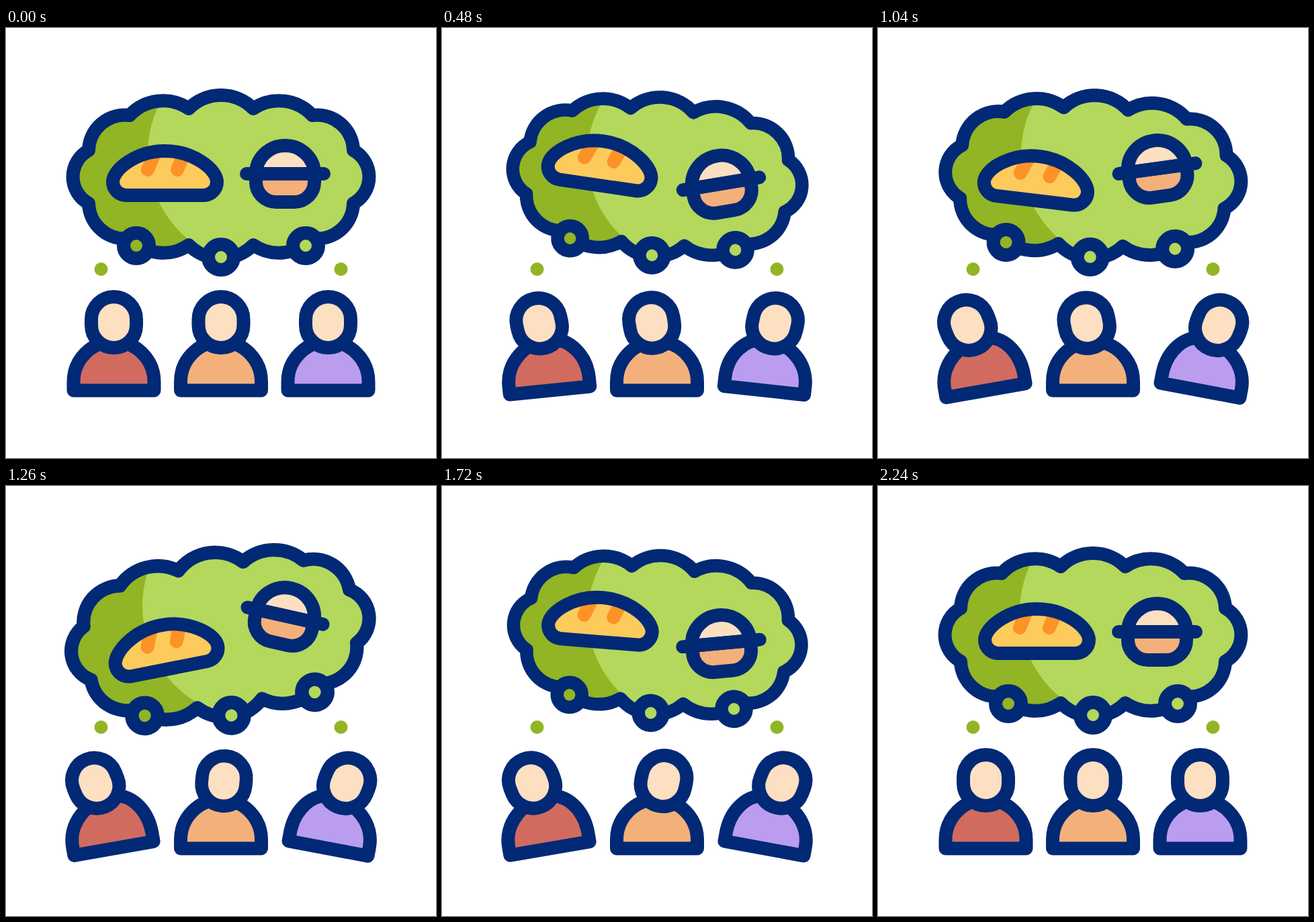
Animation, 640 px wide and 640 px high, one loop 2400 ms. Source, as an HTML page:

```html
<!DOCTYPE html>
<html lang="en">
<head>
<meta charset="utf-8">
<title>Shared thought</title>
<style>
  html, body { margin: 0; height: 100%; overflow: hidden; background: #fff; }
  svg { display: block; width: 100%; height: 100%; }
  .line { stroke: #022975; stroke-width: 20; stroke-linejoin: round; stroke-linecap: round; }
</style>
</head>
<body>
<svg viewBox="0 0 640 640">
  <defs>
    <path id="puff" d="M272 120A67.6 67.6 0 0 1 368 120A68 68 0 0 1 456 130A54 54 0 0 1 517 182
      A45 45 0 0 1 517 261A54 54 0 0 1 456 313A68 68 0 0 1 368 323A67.6 67.6 0 0 1 272 323
      A68 68 0 0 1 184 313A54 54 0 0 1 123 261A45 45 0 0 1 123 182A54 54 0 0 1 184 130A68 68 0 0 1 272 120z"/>
    <clipPath id="inside"><use href="#puff"/></clipPath>
  </defs>

  <g id="cloud">
    <use href="#puff" fill="#91b524"/>
    <path clip-path="url(#inside)" fill="#b3d85c" d="M239 95A165 165 0 0 0 303 335V350H560V95z"/>
    <use href="#puff" class="line" fill="none"/>
    <g class="line" fill="#b3d85c">
      <circle cx="194" cy="324" r="19" fill="#91b524"/>
      <circle cx="320" cy="341" r="19"/>
      <circle cx="446" cy="324" r="19"/>
    </g>
  </g>

  <g id="bread">
    <path id="loaf" fill="#fdca5c" d="M159 229C159 210 195 183 236.5 183S314 210 314 229A20 20 0 0 1 294 249H179A20 20 0 0 1 159 229z"/>
    <path d="M211 211L220 189M255 211L264 189" stroke="#fd9226" stroke-width="20" stroke-linecap="round"/>
    <use href="#loaf" class="line" style="fill-opacity:0"/>
  </g>

  <g id="bun">
    <path class="line" fill="#f4b07a" d="M372 217V229A30 30 0 0 0 402 259H429A30 30 0 0 0 459 229V217"/>
    <path class="line" fill="#fddfc1" d="M372 217A43.5 42 0 0 1 459 217z"/>
    <path class="line" d="M358 217H473"/>
  </g>

  <g fill="#91b524">
    <circle cx="141.5" cy="359" r="10"/>
    <circle cx="498.5" cy="359" r="10"/>
  </g>
  <g id="people"></g>
</svg>
<script>
  const LOOP = 2400;
  const $ = id => document.getElementById(id);

  // Each track lists [time, value] keys, eased in and out between them.
  const between = (...keys) => [[200, 0], ...keys, [2240, 0]];
  const tracks = {
    tilt: between([812, 9.1], [1375, -9.9], [1832, 7.5]),
    swing: between([812, 21.5], [1380, -17], [1832, 9.3]),
    lift: between([565, -17], [812, -17], [1220, 25], [1612, -17], [1832, -17]),
    swell: between([565, -.025], [812, -.025], [1215, .015], [1600, -.025], [1832, -.025]),
    nod: between([600, -1], [1000, -1], [1400, 1], [1810, 1]),
    duck: between([600, 1], [1810, 1]),
    lean: between([710, 1], [1660, 1])
  };

  function valueAt(keys, t) {
    const next = keys.findIndex(k => k[0] > t);
    if (next < 1) return 0;
    const [t0, a] = keys[next - 1], [t1, b] = keys[next];
    const p = (t - t0) / (t1 - t0);
    return a + (b - a) * p * p * (3 - 2 * p);
  }

  const people = [
    { x: 160.5, color: '#d16b60', body: -10, head: -12 },
    { x: 320, color: '#f4b07a', body: 0, head: 12 },
    { x: 479.5, color: '#bb9df0', body: 10.7, head: 11 }
  ];
  $('people').innerHTML = people.map(p => `
    <g transform="translate(${p.x} 539.5)"><g class="line">
      <path fill="${p.color}"/>
      <g><rect fill="#fddfc1" x="-33.5" y="-86" width="67" height="76" rx="33.5"/></g>
    </g></g>`).join('');
  const figures = document.querySelectorAll('#people .line');

  const place = (el, transform) => el.setAttribute('transform', transform);

  // Shoulders whose top slides sideways and rises.
  function shoulders(shift, rise) {
    const ry = 60 + rise;
    return `M-60 0V-13A${60 + shift} ${ry} 0 0 1 ${shift} ${-13 - ry}A${60 - shift} ${ry} 0 0 1 60 -13V0z`;
  }

  // A straight blend from upright to the turned pose, so the shape shrinks a little midway.
  function turned(degrees, side, amount) {
    const a = degrees * Math.PI / 180;
    const s = Math.sin(a) * side;
    const c = 1 - (1 - Math.cos(a)) * amount;
    return `matrix(${c} ${s} ${-s} ${c} 0 -53.5)`;
  }

  function draw(now) {
    const t = now % LOOP;
    const v = {};
    for (const name in tracks) v[name] = valueAt(tracks[name], t);

    place($('cloud'), `translate(320 230) rotate(${v.tilt}) scale(${1 + v.swell}) translate(-320 -230)`);
    place($('bread'), `translate(0 ${v.lift}) rotate(${v.swing * .88} 236.5 216)`);
    place($('bun'), `translate(0 ${-v.lift}) rotate(${-v.swing} 415.5 217)`);

    people.forEach((p, i) => {
      const [body, head] = figures[i].children;
      const bend = p.body ? v.lean : 0;
      place(figures[i], `rotate(${p.body * bend})`);
      body.setAttribute('d', shoulders(-p.head * bend, 4 * bend));
      place(head, p.body ? turned(p.head, v.lean, v.lean) : turned(p.head, v.nod, v.duck));
    });
  }

  const begin = performance.now();
  function tick() {
    draw(performance.now() - begin);
    requestAnimationFrame(tick);
  }
  tick();
</script>
</body>
</html>
```
